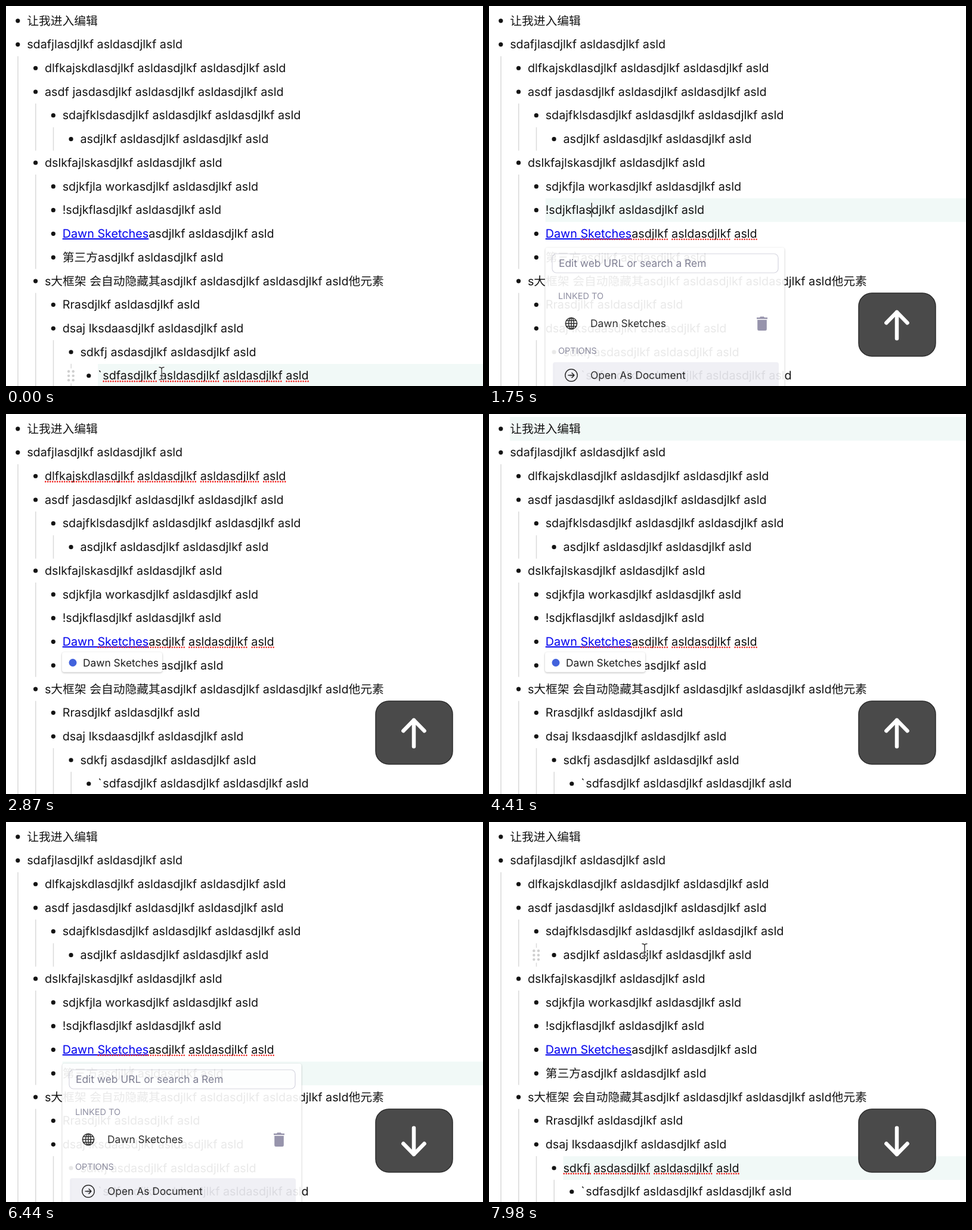
An HTML page that plays this animation: 800x638 px, repeating every 8 s.

```html
<!DOCTYPE html>
<html lang="zh-CN">
<head>
<meta charset="utf-8">
<title>Outline navigation</title>
<style>
html, body { margin: 0; width: 100%; height: 100%; overflow: hidden; background: #fff; }
svg { display: block; width: 100vw; height: 100vh; }
text {
  font-family: Inter, 'Noto Sans CJK SC', 'Noto Sans CJK', sans-serif;
  font-optical-sizing: none;
  text-rendering: geometricPrecision;
  font-size: 17.36px;
  fill: #1c1c1c;
}
#rows text { font-size: 19.76px; fill: #141414; }
#rows .link { fill: #0000ee; text-decoration: underline; }
#popup .label { font-size: 14.5px; fill: #85859a; }
#popup .hint { fill: #74748a; }
.line { fill: none; stroke: #1c1c1c; stroke-width: 1.5; stroke-linecap: round; stroke-linejoin: round; }
.squiggle { stroke: #f0201c; stroke-width: 2.6; stroke-linecap: round; stroke-dasharray: 0 4; }
.box { fill: #fff; filter: drop-shadow(0 1.5px 1.5px rgba(0, 0, 0, .28)); }
</style>
</head>
<body>
<svg id="stage" viewBox="0 0 800 638">
  <rect width="800" height="638" fill="#fff"/>
  <rect id="glow" height="39.7" fill="#f1f9f7"/>
  <g id="guides" stroke="#d9d9d9" stroke-width="1.5"></g>
  <g id="handle">
    <rect x="-6" y="-12" width="12" height="25" fill="#fff"/>
    <g id="dots" fill="#cfcfcf"></g>
  </g>
  <g id="rows"></g>
  <g id="marks"></g>
  <path id="caret" stroke="#111" stroke-width="1.3" d="M0 -12V12"/>

  <g id="tip">
    <rect class="box" x="94" y="400" width="168" height="33.5" rx="4"/>
    <circle cx="112" cy="417.5" r="6.5" fill="#4262dc"/>
    <text class="name" x="129" y="424"></text>
  </g>

  <g id="popup" opacity=".91">
    <rect class="box" x="94.5" y="405.5" width="401" height="260" rx="4"/>
    <rect x="106" y="416" width="379" height="32" rx="7" fill="#fff" stroke="#d3d3de" stroke-width="1.2"/>
    <text class="hint" x="117" y="438">Edit web URL or search a Rem</text>
    <text class="label" x="116" y="492">LINKED TO</text>
    <g class="line" transform="translate(138 533)">
      <circle r="9.6"/>
      <ellipse rx="4.4" ry="9.6"/>
      <path d="M0 -9.6V9.6M-9.6 0H9.6M-8.4 -4.8H8.4M-8.4 4.8H8.4"/>
    </g>
    <text class="name" x="170" y="538.5"></text>
    <path fill="#8d8aa4" d="M449 523H454L455 521.5H461L462 523H467V525.5H449ZM450.2 527H465.8V542.5Q465.8 545 463.3 545H452.7Q450.2 545 450.2 542.5Z"/>
    <text class="label" x="116" y="584">OPTIONS</text>
    <rect x="107" y="598" width="379" height="45" rx="4" fill="#efeff5"/>
    <g class="line" transform="translate(138 620)">
      <circle r="10.2"/>
      <path d="M-5 0H5M1 -4L5 0L1 4"/>
    </g>
    <text x="170" y="626">Open As Document</text>
  </g>

  <g id="key">
    <rect x="620" y="482" width="129" height="106" rx="22" fill="#4a4a4a" stroke="#2c2c2c" stroke-width="1.5"/>
    <path id="arrow" fill="none" stroke="#fff" stroke-width="6.5" stroke-linecap="round" stroke-linejoin="round" d="M0 22.2V-22M-17.6 -4L0 -22L17.6 -4"/>
  </g>
  <g id="mouse" fill="none" stroke-linecap="round">
    <path id="halo" stroke="#fff" stroke-width="3"/>
    <path id="beam" stroke="#333" stroke-width="1.4"/>
  </g>
</svg>
<script>
const NS = 'http://www.w3.org/2000/svg';
const $ = id => document.getElementById(id);
const LOOP = 8000, STEP = 175, LINK = 9, COLUMN = 9;
const UP = 660, DOWN = 4845, REST = 7120, WAKE = 7650;
const NAME = 'Dawn Sketches';

const rows = [
  [0, '让我进入编辑'],
  [0, 'sdafjlasdjlkf asldasdjlkf asld'],
  [1, 'dlfkajskdlasdjlkf asldasdjlkf asldasdjlkf asld'],
  [1, 'asdf jasdasdjlkf asldasdjlkf asldasdjlkf asld'],
  [2, 'sdajfklsdasdjlkf asldasdjlkf asldasdjlkf asld'],
  [3, 'asdjlkf asldasdjlkf asldasdjlkf asld'],
  [1, 'dslkfajlskasdjlkf asldasdjlkf asld'],
  [2, 'sdjkfjla workasdjlkf asldasdjlkf asld'],
  [2, '!sdjkflasdjlkf asldasdjlkf asld'],
  [2, NAME + 'asdjlkf asldasdjlkf asld'],
  [2, '第三方asdjlkf asldasdjlkf asld'],
  [1, 's大框架 会自动隐藏其asdjlkf asldasdjlkf asldasdjlkf asld他元素'],
  [2, 'Rrasdjlkf asldasdjlkf asld'],
  [2, 'dsaj lksdaasdjlkf asldasdjlkf asld'],
  [3, 'sdkfj asdasdjlkf asldasdjlkf asld'],
  [4, '`\u200asdfasdjlkf asldasdjlkf asldasdjlkf asld']
].map(([depth, str], i) => ({ str, x: 35.2 + 29.75 * depth, y: 24.6 + 39.73 * i }));

function add(parent, tag, attrs, str) {
  const el = document.createElementNS(NS, tag);
  for (const k in attrs) el.setAttribute(k, attrs[k]);
  if (str) el.textContent = str;
  parent.appendChild(el);
  return el;
}
const show = (el, on) => el.setAttribute('visibility', on ? 'inherit' : 'hidden');
const move = (el, x, y, extra = '') => el.setAttribute('transform', `translate(${x} ${y})${extra}`);

rows.forEach((row, i) => {
  add($('rows'), 'circle', { cx: row.x - 15.4, cy: row.y + .2, r: 3.6, fill: '#141414' });
  row.text = add($('rows'), 'text', { x: row.x, y: row.y + 6.9 });
  if (i === LINK) {
    add(row.text, 'tspan', { class: 'link' }, NAME);
    add(row.text, 'tspan', {}, row.str.slice(NAME.length));
  } else row.text.textContent = row.str;
});

// Dotted underlines follow the measured words.
rows.forEach((row, i) => {
  row.mark = add($('marks'), 'g', { class: 'squiggle' });
  for (const word of row.str.matchAll(/[a-z]{2,}/gi)) {
    if (i === LINK && word.index === 0) continue;
    const a = row.text.getStartPositionOfChar(word.index).x;
    const b = row.text.getEndPositionOfChar(word.index + word[0].length - 1).x;
    add(row.mark, 'path', { d: `M${a + 1.3} ${row.y + 9.6}H${b}` });
  }
  const last = Math.min(COLUMN, row.str.length) - 1;
  row.caretX = row.text.getEndPositionOfChar(last).x;
});

// Guide lines: indent level, first row, row after the last.
[[0, 2, 17], [1, 4, 6], [2, 5, 6], [1, 7, 11], [1, 12, 17], [2, 14, 17], [3, 15, 17]].forEach(([level, from, to]) =>
  add($('guides'), 'path', { d: `M${20 + 29.75 * level} ${4.9 + 39.73 * from}V${4.4 + 39.73 * to}` }));

for (const x of [-3.8, 3.8])
  for (const y of [-7, .3, 7.6]) add($('dots'), 'circle', { cx: x, cy: y, r: 2.2 });

for (const el of document.querySelectorAll('.name')) el.textContent = NAME;
for (const id of ['halo', 'beam'])
  $(id).setAttribute('d', 'M-4 -10Q0 -10 0 -7Q0 -10 4 -10M0 -7V8M-4 11Q0 11 0 8Q0 11 4 11M-2 4H2');

function focusAt(t) {
  if (t < UP) return { row: 15, age: t, rest: true, blink: t + 500 };
  if (t < DOWN) {
    const row = Math.max(0, 14 - Math.floor((t - UP) / STEP));
    return { row, age: (t - UP) % STEP, rest: row === 0, blink: Math.max(0, t - 3600) };
  }
  const row = Math.min(14, Math.floor((t - DOWN) / STEP) + 1);
  return { row, age: row === 14 ? t - REST : (t - DOWN) % STEP, rest: row === 14, blink: Math.max(0, t - REST) };
}

const within = (t, a, b) => t >= a && t < b;

function draw(t) {
  const f = focusAt(t), row = rows[f.row];
  const late = f.age >= 105;
  const lit = f.rest || !late;

  show($('glow'), lit);
  $('glow').setAttribute('x', row.x);
  $('glow').setAttribute('y', row.y - 19.6);
  $('glow').setAttribute('width', 800 - row.x);
  show($('caret'), lit && Math.floor(f.blink / 500) % 2 === 0);
  move($('caret'), row.caretX, row.y);

  rows.forEach((r, i) => show(r.mark,
    i === LINK ? within(t, 1640, WAKE) : i === f.row && (late || t < UP)));

  const popup = within(t, 1560, 1810) || within(t, 6270, 6510);
  show($('popup'), popup);
  show($('tip'), !popup && within(t, 1810, WAKE));

  show($('key'), t >= UP);
  move($('arrow'), 684, 536, t < DOWN ? '' : ' scale(1 -1)');

  // The pointer hides while keys are pressed.
  const awake = t < UP || t >= WAKE;
  const p = Math.min(1, Math.max(0, (t - WAKE) / 280));
  const my = 616.5 - 402 * p * p * (3 - 2 * p);
  const over = rows[Math.min(15, Math.floor((my - 4.8) / 39.73))];
  show($('mouse'), awake);
  show($('handle'), awake);
  move($('mouse'), 261, my);
  move($('handle'), over.x - 45.3, over.y);
}

function tick() {
  draw(performance.now() % LOOP);
  requestAnimationFrame(tick);
}
tick();
</script>
</body>
</html>
```
